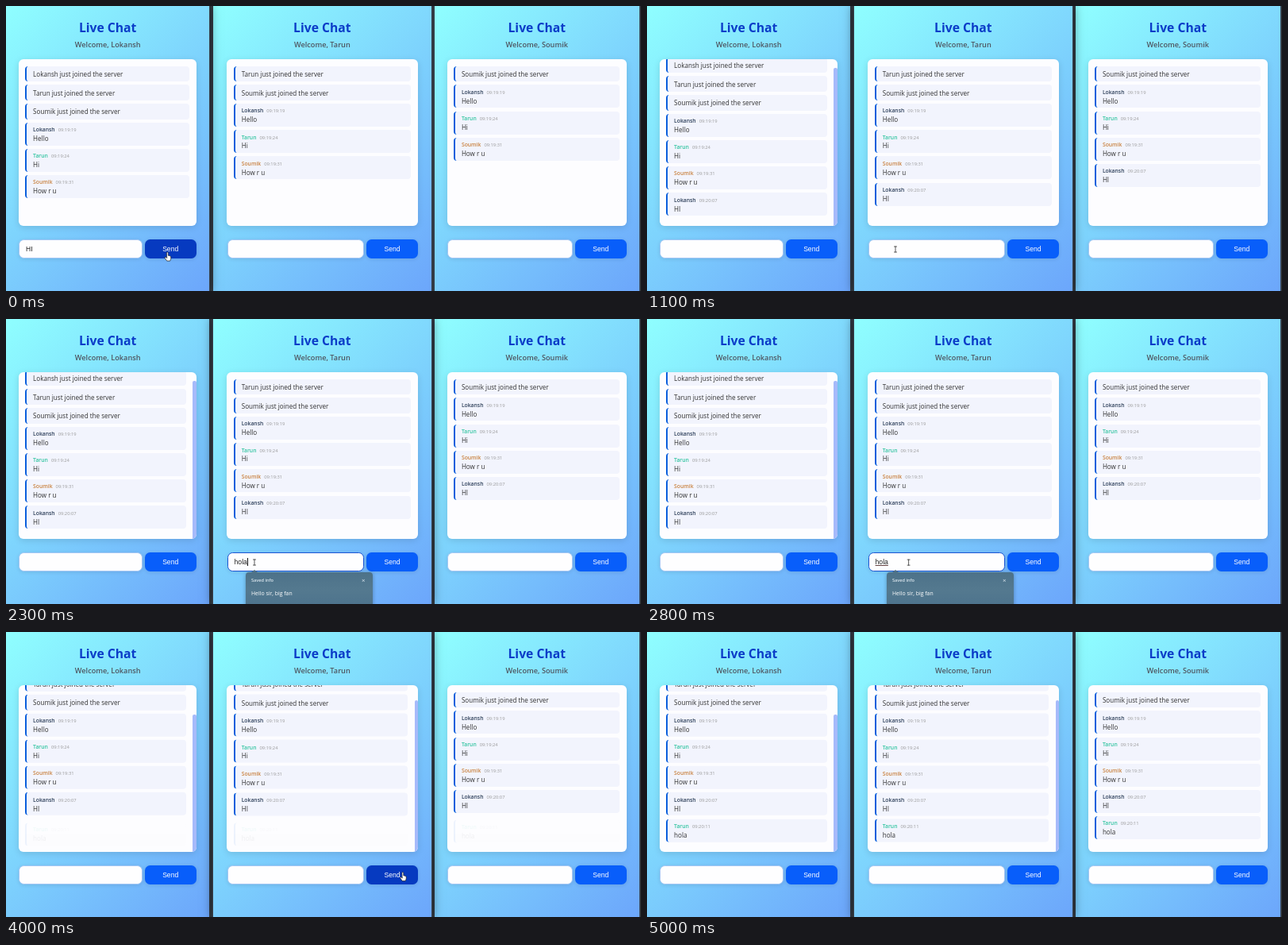
Write an HTML page that moves like this. It is 800 px wide and 359 px high and loops after 5.1 s.

```html
<!DOCTYPE html>
<html lang="en">
<head>
<meta charset="utf-8">
<title>Live Chat</title>
<style>
  html, body { margin: 0; width: 100%; height: 100%; overflow: hidden; }
  #stage {
    position: relative; width: 800px; height: 359px; overflow: hidden;
    background: #333b44; font-family: "Open Sans", "Noto Sans", sans-serif; color: #333;
  }
  #stage div, #stage svg { position: absolute; box-sizing: border-box; white-space: pre; }
  .window {
    top: 0; height: 359px;
    background: linear-gradient(135deg, #8fffff, #6ca6fb);
  }
  .window.active { z-index: 1; box-shadow: 0 0 0 1px #39424c, 0 0 13px 1px rgba(0, 0, 0, .5); }
  .title, .welcome { left: 0; width: 100%; text-align: center; }
  .title { top: 16px; font: 700 15.7px/22px "Open Sans", sans-serif; color: #0b3cc8; }
  .welcome { top: 42px; font: 600 9.2px/13px "Open Sans", sans-serif; color: #4f5660; }
  .box {
    top: 67.3px; height: 209.7px; border-radius: 6px; overflow: hidden;
    background: #fdfdff;
  }
  .shade { top: 67.3px; height: 209.7px; border-radius: 6px; box-shadow: 0 2px 8px rgba(0, 0, 0, .12); }
  .list { left: 0; top: 0; width: 100%; }
  .thumb { right: 0; width: 4.3px; background: #a6bafa; border-radius: 2px 2px 0 0; }
  .row {
    left: 8.3px; background: #f2f4fd; border-left: 2.3px solid #0b5fdc; border-radius: 4px;
    font-size: 8.1px;
  }
  .row div { left: 8.1px; }
  .notice { top: .4px; line-height: 19.5px; }
  .head { top: 4.3px; line-height: 10px; font-size: 6.8px; font-weight: 600; }
  .head span { margin-left: 4px; font-size: 5.8px; font-weight: 400; color: #999; }
  .body { top: 15.2px; line-height: 10px; }
  .input, .send {
    top: 293.5px; height: 24.3px; border-radius: 6.5px;
    font: 8.6px/24px "Liberation Sans", Arial, sans-serif; box-shadow: 0 1px 5px rgba(0, 0, 0, .1);
  }
  .input { background: #fefeff; border: 1px solid #a3c6f4; padding-left: 8px; line-height: 22.3px; color: #222; }
  .input.focus { border-color: #1c55d4; }
  .input.marked span { text-decoration: underline #644 .6px; text-underline-offset: 1px; }
  .caret { display: inline-block; width: .8px; height: 10px; margin-left: .3px; vertical-align: -2px; background: #111; }
  .send { width: 65px; text-align: center; color: #fff; }
  #popup {
    z-index: 3; left: 302px; top: 318.5px; width: 160px; height: 50px; border-radius: 4px;
    background: linear-gradient(#4d7289, #54798f 45%, #4b718c); color: #fff;
    box-shadow: 0 1px 5px rgba(0, 0, 0, .3);
  }
  #popup .tip {
    left: 7px; top: -3px; border: 4px solid transparent; border-top: 0; border-bottom: 3px solid #4d7289;
  }
  #popup .label { left: 7px; top: 6px; font-size: 5.6px; line-height: 9px; color: #dce8ef; font-weight: 600; }
  #popup .close { left: 146px; top: 5px; font-size: 8px; line-height: 9px; color: #dce8ef; }
  #popup .entry { left: 7px; top: 22px; font-size: 6.9px; line-height: 10px; }
  #cursor { z-index: 4; left: 0; top: 0; width: 14px; height: 16px; overflow: visible; }
</style>
</head>
<body>
<div id="stage">
  <div id="popup">
    <div class="tip"></div>
    <div class="label">Saved info</div>
    <div class="close">×</div>
    <div class="entry">Hello sir, big fan</div>
  </div>
  <svg id="cursor" stroke-linejoin="round" stroke-linecap="round">
    <path id="hand" fill="#fff" stroke="#222" stroke-width=".7"
      d="M-1-5q1-1 1.8 0V-1.2L3-.7 4.2.2V3L3.2 5.6H-.8L-3.4 1.8q-.3-1.4 1-1L-1 1.8Z"/>
    <path id="beam" fill="none" stroke="#333" stroke-width=".8" d="M-1.5-3.5H1.5M0-3.5V3.5M-1.5 3.5H1.5"/>
    <path id="arrow" fill="#fff" stroke="#222" stroke-width=".7" d="M-2-5V4.5L.2 2.5 1.5 5.3 2.8 4.7 1.6 2H4.5Z"/>
  </svg>
</div>
<script>
const LOOP = 5100;
const SENT = { first: 400, second: 3955 };
const PAD = 8.4, GAP = 4.2, VIEW = 209.7;

const stage = document.getElementById('stage');
const popup = document.getElementById('popup');
const cursor = document.getElementById('cursor');

const users = {
  Lokansh: '#2c3e58',
  Tarun: '#31c4a0',
  Soumik: '#c9823f'
};
const names = Object.keys(users);

const chat = [
  { name: 'Lokansh', time: '09:19:19', text: 'Hello' },
  { name: 'Tarun', time: '09:19:24', text: 'Hi' },
  { name: 'Soumik', time: '09:19:31', text: 'How r u' },
  { name: 'Lokansh', time: '09:20:07', text: 'HI', at: SENT.first },
  { name: 'Tarun', time: '09:20:11', text: 'hola', at: SENT.second }
];

// Window edges and the white box inside each window.
const frames = [
  { x: 0, w: 256.3, boxX: 15.7, boxW: 224 },
  { x: 261, w: 274.7, boxX: 17.3, boxW: 240.7 },
  { x: 539.5, w: 258.5, boxX: 16, boxW: 226.3 }
];

const clamp = v => Math.max(0, Math.min(1, v));
const progress = (t, from, to) => clamp((t - from) / (to - from));
const smooth = p => p * p * (3 - 2 * p);
const between = (t, from, to) => t >= from && t < to;

function add(parent, cls, html = '') {
  const el = document.createElement('div');
  el.className = cls;
  el.innerHTML = html;
  parent.append(el);
  return el;
}

function place(el, x, w) {
  el.style.left = x + 'px';
  el.style.width = w + 'px';
}

function buildRow(list, item) {
  const el = add(list, 'row');
  const height = item.notice ? 19.5 : 29;
  el.style.height = height + 'px';
  if (item.notice) {
    add(el, 'notice', item.notice);
  } else {
    add(el, 'head', `${item.name}<span>${item.time}</span>`).style.color = users[item.name];
    add(el, 'body', item.text);
  }
  return { el, height, at: item.at ?? -1000 };
}

function buildWindow(frame, index) {
  const el = add(stage, 'window');
  place(el, frame.x, frame.w);
  add(el, 'title', 'Live Chat');
  add(el, 'welcome', 'Welcome, ' + names[index]);
  place(add(el, 'shade'), frame.boxX, frame.boxW);
  const box = add(el, 'box');
  place(box, frame.boxX, frame.boxW);
  const list = add(box, 'list');
  const notices = names.slice(index).map(n => ({ notice: n + ' just joined the server' }));
  const rows = [...notices, ...chat].map(item => buildRow(list, item));
  const thumb = add(box, 'thumb');
  const input = add(el, 'input');
  place(input, frame.boxX + .3, frame.boxW - 68.2);
  const send = add(el, 'send', 'Send');
  send.style.left = frame.boxX + frame.boxW - 65 + 'px';
  return { el, list, rows, thumb, input, send, width: frame.boxW };
}

const windows = frames.map(buildWindow);

function layout(win, t) {
  let y = PAD;
  for (const row of win.rows) {
    const shown = t >= row.at;
    row.el.style.display = shown ? '' : 'none';
    if (!shown) continue;
    const p = smooth(progress(t, row.at, row.at + 300));
    row.el.style.top = y + 'px';
    row.el.style.opacity = p;
    row.el.style.transform = p < 1 ? `translateY(${5 * (1 - p)}px)` : '';
    y += row.height + GAP;
  }
  const total = y + PAD;
  const scroll = Math.max(0, total - VIEW);
  const bar = scroll > 0 ? 4.3 : 0;
  for (const row of win.rows) row.el.style.width = win.width - 16.8 - bar + 'px';
  win.list.style.transform = `translateY(${-scroll}px)`;
  win.thumb.style.display = bar ? '' : 'none';
  win.thumb.style.height = VIEW * VIEW / total + 'px';
  win.thumb.style.top = scroll * VIEW / total + 'px';
}

function setInput(win, text, focus, caret) {
  const html = `<span>${text}</span>` + (caret ? '<i class="caret"></i>' : '');
  if (win.html !== html) win.input.innerHTML = win.html = html;
  win.input.classList.toggle('focus', focus);
}

function setHover(win, p) {
  const mix = (a, b) => Math.round(a + (b - a) * p);
  win.send.style.background = `rgb(${mix(8, 6)},${mix(94, 58)},${mix(250, 192)})`;
}

function typed(t) {
  if (t >= 3900) return '';
  return 'hola'.slice(0, [1800, 1920, 2050, 2180].filter(k => t >= k).length);
}

// Cursor stops: time, x, y.
const path = [
  [0, 203.5, 315.5], [500, 203.5, 315.5], [1000, 313, 306.5], [2700, 313, 306.5],
  [3250, 500, 308], [4300, 500, 308], [4700, 480, 372]
];

function moveCursor(t) {
  let i = path.findLastIndex(k => t >= k[0]);
  const a = path[i], b = path[i + 1] ?? a;
  const p = a === b ? 0 : smooth(progress(t, a[0], b[0]));
  const x = a[1] + (b[1] - a[1]) * p;
  const y = a[2] + (b[2] - a[2]) * p;
  const inside = (l, r) => x > l && x < r && y > 293 && y < 318;
  const kind = inside(175, 240) || inside(454, 519) ? 'hand' : inside(278, 451) ? 'beam' : 'arrow';
  for (const shape of cursor.children) shape.style.display = shape.id === kind ? '' : 'none';
  cursor.style.transform = `translate(${x}px,${y}px)`;
}

function render(t) {
  windows.forEach((win, i) => {
    layout(win, t);
    win.el.classList.toggle('active', i === (t < 1000 ? 0 : 1));
  });

  const focus = between(t, 1400, 3900);
  const blinkFrom = t < 1800 ? 1400 : Math.max(1800, Math.min(t, 2180));
  const caret = focus && (t - blinkFrom) % 1060 < 530;
  setInput(windows[0], t < 350 ? 'HI' : '', false, false);
  setInput(windows[1], typed(t), focus, caret);
  windows[1].input.classList.toggle('marked', t >= 2700);

  setHover(windows[0], 1 - progress(t, 650, 850));
  setHover(windows[1], progress(t, 3200, 3500) - progress(t, 4400, 4650));
  setHover(windows[2], 0);

  popup.style.display = between(t, 1850, 2900) ? '' : 'none';
  moveCursor(t);
}

function tick() {
  render(performance.now() % LOOP);
  requestAnimationFrame(tick);
}
tick();
</script>
</body>
</html>
```
